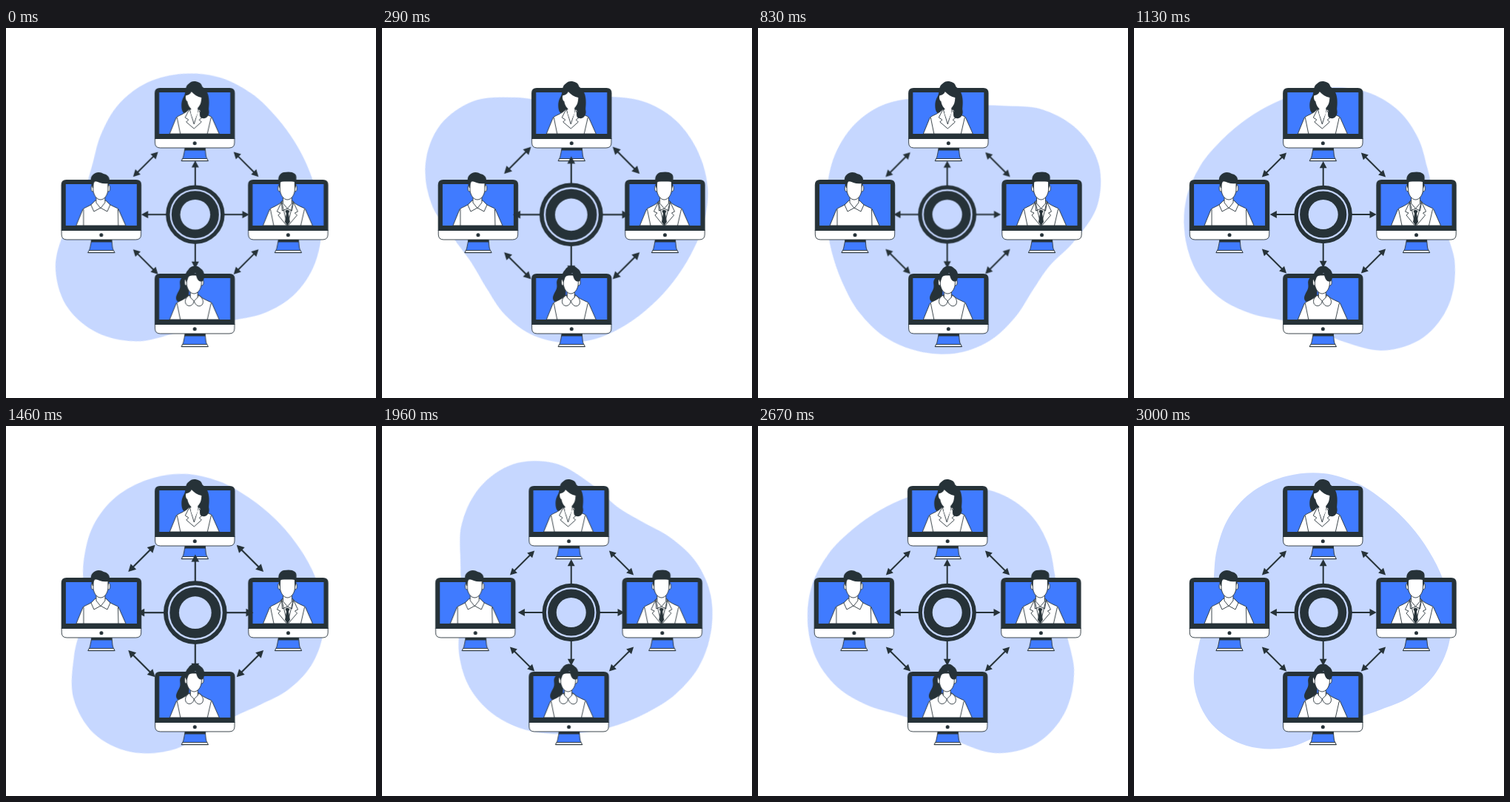
These frames come from a looping animation (500 px wide and 500 px high, 3.04 s). An HTML page:

```html
<!DOCTYPE html>
<html lang="en">
<head>
<meta charset="utf-8">
<title>Peer network</title>
<style>
  html, body { margin: 0; width: 100%; height: 100%; overflow: hidden; background: #fff; }
  svg { display: block; width: 100vw; height: 100vh; }
  #blob { fill: #c6d7ff; transform-origin: 256.5px 251px; }
  #hub { transform-origin: 256px 250.5px; }
  .dark { fill: #263238; }
  .blue { fill: #407bff; }
  .skin { fill: #fff; stroke: #263238; stroke-width: .9; stroke-linejoin: round; }
  .line { fill: none; stroke: #263238; stroke-width: .9; stroke-linejoin: round; stroke-linecap: round; }
  .shaft { fill: none; stroke: #263238; stroke-width: 2; }
</style>
</head>
<body>
<svg viewBox="0 0 500 500">
  <defs>
    <g id="monitor">
      <path class="blue" d="M-13 81H14L15 91C15.3 94 17 96 17.500 98H-17.500C-17 96 -15.300 94 -15 91Z" stroke="#263238" stroke-width=".9"/>
      <path class="dark" d="M-13.500 81H14.200L14.500 84.500H-13.800Z"/>
      <path class="skin" d="M-16.500 95.500H16.500L18 98.600H-18Z"/>
      <path class="line" d="M-18 98.600H18"/>
      <path class="skin" d="M-53.700 68H53.700V74Q53.700 81 46.700 81H-46.700Q-53.700 81 -53.700 74Z"/>
      <path class="dark" d="M-54.200 69V7Q-54.200 0 -47.200 0H47.200Q54.200 0 54.200 7V69Z"/>
      <rect class="blue" x="-48" y="6" width="96" height="56"/>
      <circle class="dark" cy="74.700" r="2.500"/>
    </g>
    <path id="torso" class="skin" d="M-34 62L-25 40C-22 37 -13 35 -8 29H6C11 35 20 37 23 39.500L33 62Z"/>
    <path id="arms" class="line" d="M-24 40L-19.500 62M22 40L17 62"/>
    <g id="face">
      <ellipse class="skin" cx="-11.500" cy="11.500" rx="2.300" ry="4.500"/>
      <ellipse class="skin" cx="9.500" cy="11.500" rx="2.300" ry="4.500"/>
      <path class="skin" d="M-11 2V14C-10.500 21 -6 27 -1 27C4 27 8.500 21 9 14V2Z"/>
    </g>
    <path id="head" class="dark" d="M0 0L-4.900 9.200H4.900Z"/>
    <g id="spoke">
      <path class="shaft" d="M0 -38V-66"/>
      <use href="#head" y="-72"/>
    </g>
    <g id="link">
      <path class="shaft" d="M0 -17V17"/>
      <use href="#head" y="-23.500"/>
      <use href="#head" y="-23.500" transform="rotate(180)"/>
    </g>
  </defs>

  <path id="blob"/>

  <g id="peers">
    <!-- woman with long hair -->
    <g transform="translate(255.300 81)">
      <use href="#monitor"/>
      <path class="dark" d="M-1 -9C-6 -9 -7 -6 -9 -5C-13 -2 -12 4 -14 10C-16 14 -18 17 -18 24C-18 30 -16 35 -11 36L7 40C13 44 20 40 19 31C18.500 27 20 22 19 14C18 4 13 1 10 -2C9 -7 4 -9 -1 -9Z"/>
      <use href="#torso"/>
      <path class="dark" d="M6 18C12 24 4 34 8 40C13 43 20 40 19 31L17 14Z"/>
      <use href="#arms"/>
      <path class="skin" d="M-7 29L-1 49L5 29Z"/>
      <path class="line" d="M-8 30L-13 40L-8.500 43L-11.500 46L-1 55L9 46L6 43L10 40L6 31"/>
      <path d="M-4.500 5C-6 9 -10 10 -11.500 10C-13 11 -12.500 17 -10 18C-9 24 -6 27 -5 28V35L-1 45L4 34V27C8 23 9 18 9 13C4 12 -1 9 -4.500 5Z" fill="#fff"/>
    </g>

    <!-- man in a shirt -->
    <g transform="translate(129 205)">
      <use href="#monitor"/>
      <use href="#torso"/>
      <path class="line" d="M-24 40V62M22.500 40L23 62"/>
      <path class="skin" d="M-8 28L-14 34L-10 43L-1 38L8 43L12 34L6 28Z"/>
      <path class="skin" d="M-7 24V31L-1 38.500L5 31V24Z"/>
      <use href="#face"/>
      <path class="dark" d="M-12 11C-15 3 -15 -3 -12 -6C-8 -11 -1 -11 3 -8C8 -7 11 -4 11 0C11 5 10 8 9 11V5C2 6 -4 4 -8 1C-10 4 -11 6 -11 11Z"/>
    </g>

    <!-- man in a suit -->
    <g transform="translate(381.500 205)">
      <use href="#monitor"/>
      <use href="#torso"/>
      <use href="#arms"/>
      <path class="skin" d="M-9 29L-1 62L7 29Z"/>
      <path class="dark" d="M-4 42L-1.500 40.500L2 42L.5 46L2.500 57L-1 62L-4.500 57L-2.500 46Z"/>
      <path class="line" d="M-9 30L-15 43L-10.500 45L-13.500 48L-2 62M7 30L13 43L9 45L12 48L0 62M-9 30L-8 42L-1 39L5 42L7 30"/>
      <path class="skin" d="M-7 24V32L-1 39L5 32V24Z"/>
      <use href="#face"/>
      <path class="dark" d="M-12 12C-13 6 -13 4 -13 2C-14 -4 -11 -9 -6 -10C0 -11 6 -11 9 -8C12 -6 11 -1 11 2C11 6 10.500 9 10 12L8.500 3C3 1 -4 1 -10 3Z"/>
    </g>

    <!-- woman with a ponytail -->
    <g transform="translate(255.300 332)">
      <use href="#monitor"/>
      <path class="dark" d="M-8 4C-16 2 -21 7 -20 14C-19 21 -22 23 -24 28C-28 36 -22 40 -17 38C-10 36 -7 30 -8 22Z"/>
      <use href="#torso"/>
      <use href="#arms"/>
      <path class="skin" d="M-6 24V33L-1 38L4 33V24Z"/>
      <path class="skin" d="M-7 29C-12 32 -14 36 -12 41C-8 46 -2 43 -1 37C1 43 6 46 10 42C13 37 10 32 5 29L4 32L-1 37L-6 32Z"/>
      <use href="#face"/>
      <path class="dark" d="M-12 10C-15 4 -12 -2 -9 -5C-6 -11 3 -13 8 -7C13 -4 14 3 12 8C11 11 9 11 6 10C3 8 2 3 1 -1C-3 3 -8 2 -9 6L-11 12Z"/>
    </g>
  </g>

  <g id="hub">
    <g transform="translate(255.700 252)">
      <use href="#spoke"/>
      <use href="#spoke" transform="rotate(90)"/>
      <use href="#spoke" transform="rotate(180)"/>
      <use href="#spoke" transform="rotate(270)"/>
      <circle class="dark" r="39.200"/>
      <circle r="32.700" fill="none" stroke="#c6d7ff" stroke-width="2.200"/>
      <circle r="20" fill="#c6d7ff"/>
    </g>
    <use href="#link" transform="translate(189.500 185) rotate(45)"/>
    <use href="#link" transform="translate(323.500 185) rotate(-45)"/>
    <use href="#link" transform="translate(189.500 315) rotate(-45)"/>
    <use href="#link" transform="translate(323.500 315) rotate(45)"/>
  </g>
</svg>
<script>
  const byId = id => document.getElementById(id);

  // Blob outline: radii at equal angles, joined by a closed Catmull-Rom curve.
  const radii = [172, 174.5, 172, 163.5, 153, 151, 164, 190, 209, 214.5, 202, 175,
    154.5, 154.5, 167, 181, 189, 190, 187, 179, 170, 165, 164, 167];
  const count = radii.length;
  const point = i => {
    const k = (i + count) % count;
    const a = k / count * 2 * Math.PI;
    return [256.5 + radii[k] * Math.cos(a), 251 + radii[k] * Math.sin(a)];
  };
  const handle = (p, from, to) => p.map((v, k) => v + (to[k] - from[k]) / 6);
  let d = 'M' + point(0);
  for (let i = 0; i < count; i++) {
    const [a, b, c, e] = [i - 1, i, i + 1, i + 2].map(point);
    d += `C${handle(b, a, c)} ${handle(c, e, b)} ${c}`;
  }
  byId('blob').setAttribute('d', d + 'Z');

  // One stepped clock across whole keyframe lists, which CSS easing cannot express.
  const play = (id, frames) => byId(id).animate(frames, {
    duration: 3040, delay: -4, iterations: Infinity, easing: 'steps(73, jump-start)'
  });
  const shake = [0, -1, 2, -4, 4, -4, 4, -4, 2, -1];
  const beat = [[0, 1], [.1, 1.1], [.3, 1], [.4, 1], [.5, 1.1], [.6, 1], [1, 1]];

  play('blob', [{ transform: 'rotate(0deg)' }, { transform: 'rotate(720deg)' }]);
  play('peers', [...shake, ...shake, 0].map(x => ({ transform: `translateX(${x}px)` })));
  play('hub', beat.map(([offset, s]) => ({ offset, transform: `scale(${s})` })));
</script>
</body>
</html>
```
